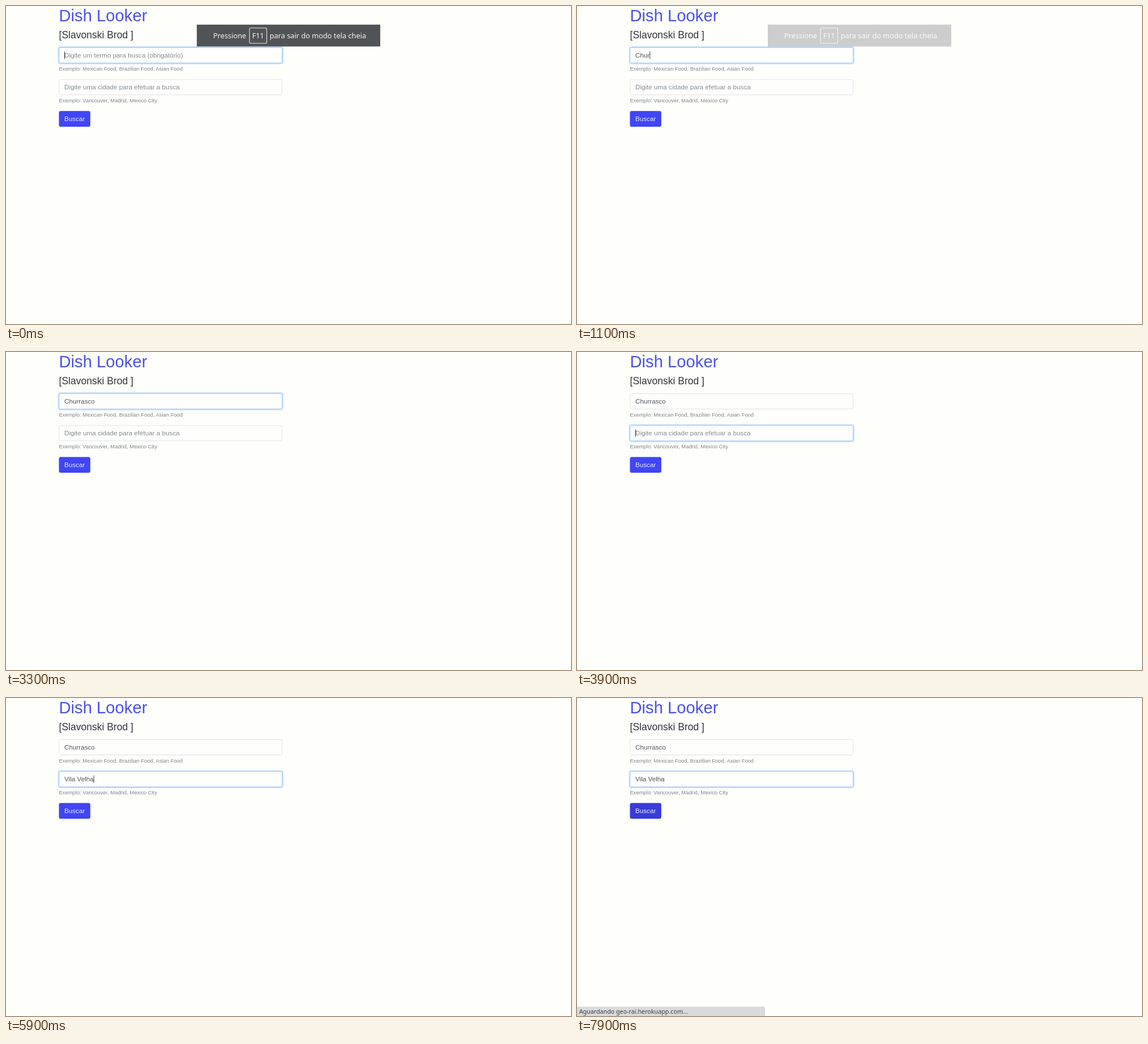
An HTML page for the animation above (8000 ms loop, 998 px wide and 561 px high).

```html
<!DOCTYPE html>
<html lang="pt-BR">
<head>
<meta charset="utf-8">
<title>Dish Looker</title>
<style>
  html, body { margin: 0; width: 100%; height: 100%; overflow: hidden; background: #fefefb; }
  svg { display: block; width: 100%; height: 100%; }
  text { font: 16px "Liberation Sans", Arial, sans-serif; fill: #4f555b; white-space: pre; }
  .title { font-size: 40px; fill: #4b50ea; }
  .place { font-size: 24px; fill: #303438; }
  .help { font-size: 12.9px; fill: #7f858b; }
  .hint { fill: #858b91; }
  .label { fill: #e8e8ff; }
  .box { fill: #fefefc; }
  .glow { fill: none; stroke: #007bff; stroke-opacity: .25; stroke-width: 2.6px; }
  .caret { fill: #30363c; }
  .ui { font-family: "Noto Sans", "Open Sans", sans-serif; }
  #toast text { font-size: 17.5px; fill: #f4f4f4; }
  #status text { font-size: 14.7px; fill: #3c3e40; }
</style>
</head>
<body>
<svg viewBox="0 0 1366 768" preserveAspectRatio="none">
  <text class="title" x="128" y="37.1">Dish Looker</text>
  <text class="place" x="128" y="77.9">[Slavonski Brod ]</text>

  <g class="field" transform="translate(128 100)">
    <rect class="glow" x="-1.3" y="-1.3" width="542.6" height="40.6" rx="5"/>
    <rect class="box" x=".5" y=".5" width="539" height="37" rx="3.5"/>
    <text class="hint" x="13" y="24.3">Digite um termo para busca (obrigatório)</text>
    <text class="value" x="13" y="24.3"></text>
    <rect class="caret" y="10" width="1.3" height="18"/>
  </g>
  <text class="help" x="128" y="156">Exemplo: Mexican Food, Brazilian Food, Asian Food</text>

  <g class="field" transform="translate(128 177)">
    <rect class="glow" x="-1.3" y="-1.3" width="542.6" height="40.6" rx="5"/>
    <rect class="box" x=".5" y=".5" width="539" height="37" rx="3.5"/>
    <text class="hint" x="13" y="24.3">Digite uma cidade para efetuar a busca</text>
    <text class="value" x="13" y="24.3"></text>
    <rect class="caret" y="10" width="1.3" height="18"/>
  </g>
  <text class="help" x="128" y="233.2">Exemplo: Vancouver, Madrid, Mexico City</text>

  <rect id="button" x="128" y="253.6" width="75.8" height="38" rx="4"/>
  <text class="label" x="141" y="278.2">Buscar</text>

  <g id="toast">
    <rect x="461.3" y="45" width="443.5" height="52.8" fill="#515457"/>
    <text class="ui" x="501" y="77.5">Pressione</text>
    <rect x="588.7" y="53" width="41.6" height="37" rx="3" fill="none" stroke="#e6e6e6" stroke-width="1.5"/>
    <text class="ui" x="609.5" y="77.5" text-anchor="middle">F11</text>
    <text class="ui" x="637.5" y="77.5">para sair do modo tela cheia</text>
  </g>

  <g id="status">
    <path d="M0 745.5H451q3.500 0 3.500 3.500V768H0z" fill="#d8dadb"/>
    <text class="ui" x="5" y="762">Aguardando geo-rai.herokuapp.com...</text>
  </g>
</svg>
<script>
const LOOP = 8000, STEP = 100, BLINK = 550;
const FOCUS_SWITCH = 3400, FOCUS_TIME = 150;
const FADE_START = 730, FADE_TIME = 515;

// Each entry: [time, field content from then on]
const typing = [
  [[0, ''], [400, 'C'], [600, 'Ch'], [800, 'Chu'], [1000, 'Chur'], [1300, 'Churr'],
   [1500, 'Churra'], [1800, 'Churras'], [2000, 'Churrasx'], [2700, 'Churrasco']],
  [[FOCUS_SWITCH, ''], [4500, 'V'], [4800, 'Vi'], [4900, 'Vil'], [5100, 'Vila'], [5200, 'Vila '],
   [5400, 'Vila V'], [5500, 'Vila Ve'], [5600, 'Vila Vel'], [5800, 'Vila Velh'], [5900, 'Vila Velha']]
];

const $ = id => document.getElementById(id);
const clamp = v => Math.max(0, Math.min(1, v));
const smooth = v => v * v * (3 - 2 * v);
const mix = (a, b, k) => `rgb(${a.map((v, i) => Math.round(v + (b[i] - v) * k))})`;

const fields = [...document.querySelectorAll('.field')].map((el, i) => {
  const part = name => el.querySelector('.' + name);
  return { keys: typing[i], glow: part('glow'), box: part('box'), hint: part('hint'),
           value: part('value'), caret: part('caret') };
});

function drawField(f, t, focus, active) {
  const [since, text] = f.keys.filter(k => k[0] <= t).pop() || f.keys[0];
  if (f.value.textContent !== text) f.value.textContent = text;
  f.hint.style.opacity = text ? 0 : 1;
  f.glow.style.opacity = focus;
  f.box.style.stroke = mix([215, 219, 223], [128, 189, 255], focus);
  const lit = active && Math.floor((t - since) / BLINK) % 2 === 0;
  f.caret.style.opacity = lit ? 1 : 0;
  f.caret.setAttribute('x', 13 + (text ? f.value.getComputedTextLength() : 0));
}

function draw(now) {
  const t = Math.floor(now % LOOP / STEP) * STEP;
  const moved = smooth(clamp((t - FOCUS_SWITCH) / FOCUS_TIME));
  const second = t >= FOCUS_SWITCH;
  drawField(fields[0], t, 1 - moved, !second);
  drawField(fields[1], t, moved, second);
  $('toast').style.opacity = 1 - clamp((t - FADE_START) / FADE_TIME);
  $('status').style.opacity = t >= 6400 ? 1 : 0;
  $('button').style.fill = mix([64, 69, 246], [56, 60, 218], clamp((t - 7700) / 200));
}

const start = performance.now();
function tick() {
  draw(performance.now() - start);
  requestAnimationFrame(tick);
}
tick();
</script>
</body>
</html>
```
